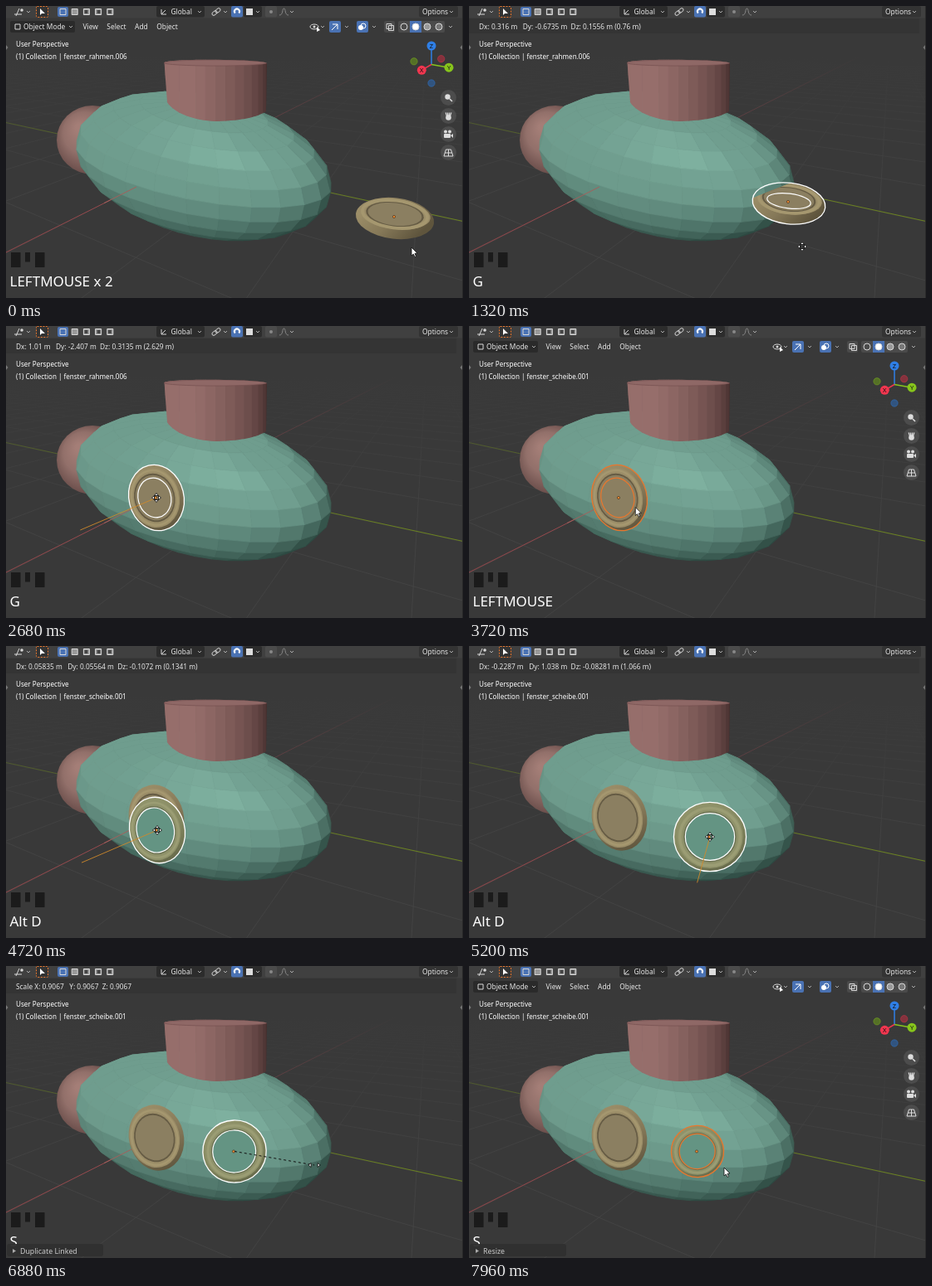
Write an HTML page with a canvas that moves like this. It is 550 px wide and 352 px high and loops after 8 s.

```html
<!DOCTYPE html>
<html lang="en">
<head>
<meta charset="utf-8">
<title>Placing portholes on a hull</title>
<style>
  html, body { margin: 0; width: 100%; height: 100%; overflow: hidden; background: #393939; }
  canvas { display: block; }
</style>
</head>
<body>
<canvas id="stage" width="550" height="352"></canvas>
<script>
const ctx = document.getElementById('stage').getContext('2d');
const LOOP = 8000, STEP = 40, TAU = Math.PI * 2;
const ORANGE = '#e9772d', BLUE = '#4a72b3', LIGHT = '#d8d8d8', DARK = '#2c2c2c';

// When each tool is active, and when the dragged frame snaps onto the hull
const GRAB = [940, 2900], COPY = [4300, 5500], RESIZE = [6600, 7350];
const SNAP = 1740, RESELECT = 3700;

const framePath = [
  { at: GRAB[0], x: 468, y: 256, move: [0, 0, 0] },
  { at: 1320, x: 385, y: 238, move: [.316, -.6735, .1556] },
  { at: 2520, x: 181, y: 207, move: [1.01, -2.407, .3135] }];
const copyPath = [
  { at: COPY[0], x: 181, y: 207, move: [0, 0, 0] },
  { at: 4720, x: 182, y: 222, move: [.05835, .05564, -.1072] },
  { at: 5200, x: 290, y: 230, move: [-.2287, 1.038, -.08281] },
  { at: COPY[1], x: 275, y: 223.5, move: [-.185, .9012, -.0364] }];

const lerp = (a, b, p) => a + (b - a) * p;
const clamp = v => Math.min(1, Math.max(0, v));
const progress = (t, [start, end]) => clamp((t - start) / (end - start));
const during = (t, [start, end]) => t >= start && t < end;

function along(path, t) {
  const next = Math.max(1, path.findIndex((stop, i) => stop.at > t || i === path.length - 1));
  const a = path[next - 1], b = path[next], p = progress(t, [a.at, b.at]);
  return { x: lerp(a.x, b.x, p), y: lerp(a.y, b.y, p), move: a.move.map((v, i) => lerp(v, b.move[i], p)) };
}
const glide = (a, b, p) => ({ x: lerp(a.x, b.x, p), y: lerp(a.y, b.y, p) });

// A porthole on the hull turns towards the viewer as it nears the middle
function onHull({ x, y }) {
  const d = x - 181;
  return { x, y, rx: 33 + d * .097, ry: 40 + d * .015, tilt: Math.min(0, d * .0022 - .24), shift: Math.min(0, d * .02 - 2.2) };
}
const onFloor = ({ x, y }) => ({ x, y, rx: 44 + (x - 385) * .04, ry: 24.7, tilt: .12, shift: 0, flat: true });

const mix = (a, b, p) => `rgb(${a.map((v, i) => Math.round(lerp(v, b[i], p))).join()})`;
function paint(fill, stroke, width = 1) {
  if (fill) { ctx.fillStyle = fill; ctx.fill(); }
  if (stroke) { ctx.strokeStyle = stroke; ctx.lineWidth = width; ctx.stroke(); }
}
function shape(points, fill, stroke, width, closed = true) {
  ctx.beginPath();
  points.forEach(([x, y]) => ctx.lineTo(x, y));
  if (closed) ctx.closePath();
  paint(fill, stroke, width);
}
const line = (x1, y1, x2, y2, color, width) => shape([[x1, y1], [x2, y2]], null, color, width, false);
function oval(x, y, rx, ry, tilt, fill, stroke, width) {
  ctx.beginPath();
  ctx.ellipse(x, y, rx, ry, tilt, 0, TAU);
  paint(fill, stroke, width);
}
const dot = (x, y, r, fill, stroke, width) => oval(x, y, r, r, 0, fill, stroke, width);
function box(x, y, w, h, fill, stroke, r = 2) {
  ctx.beginPath();
  ctx.roundRect(x, y, w, h, r);
  paint(fill, stroke);
}
function text(str, x, y, size = 8.4, color = '#e6e6e6', align = 'left') {
  ctx.font = `${size}px "Noto Sans", "Open Sans", sans-serif`;
  ctx.textAlign = align;
  ctx.fillStyle = color;
  ctx.fillText(str, x, y);
  return ctx.measureText(str).width;
}
const chevron = (x, y) => shape([[x - 2, y - 1], [x, y + 1], [x + 2, y - 1]], null, '#aaa', 1, false);
function gradient(g, ...colors) {
  colors.forEach((c, i) => g.addColorStop(i / (colors.length - 1), c));
  return g;
}

function drawFloor() {
  const kx = .172, ky = .097;
  const project = (x, y) => {
    const a = x * kx, b = y * ky, w = 1 + a + b;
    return [(217 + a * 506 - b * 458) / w, (188 + (a + b) * 42) / w];
  };
  ctx.fillStyle = '#393939';
  ctx.fillRect(0, 0, 550, 352);
  for (let n = -5; n <= 24; n++) {
    line(...project(n, (-.8 - n * kx) / ky), ...project(n, 60), '#464646', .8);
    line(...project((-.8 - n * ky) / kx, n), ...project(60, n), '#464646', .8);
  }
  line(0, 297, 217, 188, '#93474b');
  line(217, 188, 470, 61, '#8b454b');
  line(0, 140.5, 550, 259.5, '#6b8220');
  ctx.fillStyle = gradient(ctx.createLinearGradient(0, 60, 0, 240), '#393939', '#39393900');
  ctx.fillRect(0, 0, 550, 240);
}

function drawHull() {
  const RINGS = 12, SEGMENTS = 24;
  const light = [.57, -.03, .8], glint = [.68, .22, .7], view = [.8, .337, .5];
  const dot3 = (a, b) => a.reduce((sum, v, i) => sum + v * b[i], 0);
  const point = (ring, seg) => {
    const lat = (ring / RINGS - .5) * Math.PI, lon = seg / SEGMENTS * TAU;
    return [Math.cos(lat) * Math.cos(lon), Math.cos(lat) * Math.sin(lon), Math.sin(lat)];
  };
  const project = ([x, y, z]) => [238 - 60 * x + 142 * y, 193 + 30 * x + 40 * y - 75 * z];
  for (let r = 0; r < RINGS; r++) for (let s = 0; s < SEGMENTS; s++) {
    const [x, y, z] = point(r + .5, s + .5);
    if (dot3([x, y, z], view) < -.06) continue;
    const size = Math.hypot(x, y / 2, z), normal = [x / size, y / 2 / size, z / size];
    const gloss = Math.max(0, dot3(normal, glint)) ** 24;
    const color = mix([46, 75, 67], [111, 157, 142], clamp((dot3(normal, light) + .5) / 1.2) + gloss * .24);
    shape([[r, s], [r, s + 1], [r + 1, s + 1], [r + 1, s]].map(p => project(point(...p))), color, color, .8);
  }
  line(118, 237.6, 157, 218, '#a3605c');
}

function drawTower() {
  const COUNT = 16;
  ctx.save();
  ctx.beginPath();
  ctx.moveTo(190.5, 68);
  ctx.lineTo(194, 116);
  ctx.bezierCurveTo(204, 132, 234, 139, 255, 139);
  ctx.bezierCurveTo(285, 138, 302, 134, 313, 127);
  ctx.lineTo(314, 69);
  ctx.bezierCurveTo(310, 64, 196, 63, 190.5, 68);
  ctx.clip();
  for (let i = 0; i < COUNT; i++) {
    const edge = n => 252 - 62 * Math.cos(n / COUNT * Math.PI);
    ctx.fillStyle = mix([150, 110, 107], [70, 47, 46], clamp((i - 5) / 10) ** 1.3);
    ctx.fillRect(edge(i), 60, edge(i + 1) - edge(i) + .6, 82);
  }
  oval(252, 68.5, 62, 3.6, 0, '#8f6866', '#74504f', .7);
  ctx.restore();
}

function drawTail() {
  oval(104, 161.5, 43, 41.5, 0,
    gradient(ctx.createRadialGradient(88, 146, 4, 100, 160, 46), '#a47e77', '#92706a', '#664a47'));
}

function drawPorthole({ x, y, rx, ry, tilt, shift, flat }, { glass, outline, sunken }) {
  const ring = (scale, ...style) => oval(x + shift, flat ? y - 5 : y, rx * scale, ry * scale * (flat ? .8 : 1), tilt, ...style);
  const hole = glass ? .68 : .6;
  ctx.save();
  if (sunken) {
    ctx.beginPath();
    [[-50, -4], [8, -27], [60, -27], [60, 40], [-50, 40]].forEach(([dx, dy]) => ctx.lineTo(x + dx, y + dy));
    ctx.clip();
  }
  const side = ctx.createLinearGradient(x - rx / 2, y - ry, x + rx / 2, y + ry);
  oval(x, y, rx, ry, tilt, gradient(side, ...(glass ? ['#92956c', '#84875f', '#66694a'] : ['#9c8e68', '#857858', '#5f553d'])));
  ring(.91, glass ? '#8f926a' : '#9b8d68');
  ring(.83, null, glass ? '#9b9d74' : '#a5976f', rx * .08);
  if (glass) {
    ring(.73, '#6c7253');
    ring(hole, '#649483');
  } else {
    ring(.74, '#655b44');
    ring(.69, '#8b7f61');
  }
  ctx.restore();
  if (!outline) return;
  oval(x, y, rx, ry, tilt, null, outline, 1.3);
  oval(x + shift, flat ? y - 3 : y, rx * hole, ry * (flat ? .36 : hole), tilt, null, outline, 1.2);
}

function drawToolbar() {
  ctx.fillStyle = '#404040';
  ctx.fillRect(0, 0, 550, 14.5);
  line(10, 10, 19, 10, LIGHT);
  line(12, 12, 16, 3, LIGHT);
  dot(19, 5, 1.8, LIGHT);
  ctx.setLineDash([2, 1.5]);
  box(36.5, .5, 14, 13, '#333', ORANGE, 1);
  ctx.setLineDash([]);
  shape([[41, 3], [41, 11], [43, 9], [47, 9]], '#fff');
  for (let i = 0; i < 5; i++) {
    const x = 62 + i * 14.2;
    if (!i) box(x, 1, 13, 12, BLUE);
    box(x + 3, 3.5, 7, 7, i ? '#999' : null, LIGHT, 0);
    if (i > 1) box(x + 4 + i % 2, 5, 4, 4, '#444', null, 0);
  }
  box(181, 0, 58, 13.5, DARK);
  shape([[187, 4], [187, 10], [193, 10]], null, LIGHT, 1, false);
  line(187, 10, 192, 5, LIGHT);
  text('Global', 198.5, 10);
  oval(251, 8.5, 3.5, 2.2, -.7, null, LIGHT);
  oval(255, 5.5, 3.5, 2.2, -.7, null, LIGHT);
  box(271, 0, 14, 13.5, BLUE);
  ctx.beginPath();
  ctx.arc(278, 6.5, 3, 2.4, 7);
  paint(null, '#fff', 2);
  box(286, 0, 22, 13.5, DARK);
  box(289, 3, 8, 8, '#ddd', null, 0);
  box(312, 0, 14, 13.5, '#4b4b4b');
  dot(319, 7, 2, '#888');
  ctx.beginPath();
  ctx.moveTo(329, 11);
  ctx.bezierCurveTo(334, 11, 332, 3, 334.5, 3);
  ctx.bezierCurveTo(337, 3, 335, 11, 340, 11);
  paint(null, '#888');
  box(497, 0, 47, 13.5, '#333');
  text('Options', 501, 10);
  [27, 233, 264, 303, 344, 536].forEach(x => chevron(x, 7));
}

function drawHeader() {
  box(5, 18, 78, 14, '#2a2a2a');
  box(11, 22, 6, 6, null, LIGHT, 0);
  text('Object Mode', 21, 28);
  let x = 92.5;
  for (const label of ['View', 'Select', 'Add', 'Object']) x += text(label, x, 28) + 10.5;
  oval(371, 25, 5, 3, 0, null, LIGHT);
  dot(371, 25, 1.5, LIGHT);
  shape([[374, 25], [374, 31], [378, 29]], '#fff');
  [389, 422].forEach(left => box(left, 18, 14, 14, BLUE));
  shape([[393, 22], [399, 22], [399, 28]], null, '#fff', 1, false);
  line(392, 29, 399, 22, '#fff');
  dot(427, 26, 3, '#fff');
  dot(430, 24, 3, null, '#fff');
  box(455, 18, 13, 14, '#4a4a4a');
  [458, 460.5].forEach((left, i) => box(left, 21.5 + i * 2, 6, 6, null, LIGHT, 0));
  box(472, 18, 56, 14, '#4b4b4b');
  box(486, 18, 14, 14, BLUE, null, 0);
  [null, '#fff', '#999', '#777'].forEach((fill, i) => dot(479 + i * 14, 25, 4, fill, LIGHT));
  [78, 381, 410, 443, 535].forEach(left => chevron(left, 25));
}

function drawGizmo() {
  const axes = [
    { label: 'Z', dx: 0, dy: -22.5, color: '#2f7fe6', back: '#31547f' },
    { label: 'Y', dx: 21, dy: 3.7, color: '#87c51c', back: '#557026' },
    { label: 'X', dx: -11.7, dy: 6.8, color: '#f1364f', back: '#85323d' }];
  axes.forEach(({ dx, dy, back, color }) => dot(512 - dx, 70.5 - dy, 4.2, back, color + '66'));
  for (const { label, dx, dy, color } of axes) {
    line(512, 70.5, 512 + dx, 70.5 + dy, color, 1.5);
    dot(512 + dx, 70.5 + dy, 5.5, color);
    text(label, 512 + dx, 73.2 + dy, 7.5, '#111', 'center');
  }
  for (let i = 0; i < 4; i++) dot(532.5, 110.5 + i * 22, 9.5, '#4c4c4c');
  dot(531.5, 109.5, 3.2, '#ddd');
  line(534, 112, 537, 115, '#ddd', 1.6);
  dot(532.5, 134.5, 3.3, '#ddd');
  for (let i = -1.5; i < 2; i++) line(532.5 + i, 134, 532.5 + i * 2.2, 128.5, '#ddd', 1.3);
  box(527, 154, 8, 5, '#ddd', null, 1);
  [529, 534].forEach(left => dot(left, 151.5, 2, '#ddd'));
  shape([[535, 156], [538, 154], [538, 159]], '#ddd');
  shape([[529.5, 173], [535.5, 173], [538, 181], [527, 181]], null, '#ddd');
  line(532.5, 173, 532.5, 181, '#ddd');
  line(528, 177, 537, 177, '#ddd');
}

function drawArrow({ x, y }) {
  shape([[0, 0], [0, 10], [2.3, 8], [4, 11.5], [5.5, 10.8], [4, 7.3], [7, 7]]
    .map(p => [x + p[0], y + p[1]]), '#fff', '#111', .8);
}
function drawArrowheads({ x, y }, count, distance) {
  for (let i = 0; i < count; i++) {
    ctx.save();
    ctx.translate(x, y);
    ctx.rotate(i / count * TAU);
    shape([[distance, 0], [distance - 3, 2.5], [distance - 3, -2.5]], '#fff', '#111', .9);
    ctx.restore();
  }
}

const metres = v => parseFloat(v.toPrecision(4)) + ' m';
const moveText = ([dx, dy, dz]) =>
  `Dx: ${metres(dx)}   Dy: ${metres(dy)}  Dz: ${metres(dz)} (${metres(Math.hypot(dx, dy, dz))})`;
const scaleText = s => ['Scale X', '  Y', ' Z'].map(axis => `${axis}: ${s.toFixed(4)}`).join(' ');

function pointerAt(t, frame, copy, scale) {
  const aside = { x: 381, y: 238 }, edge = { x: copy.x + 106 * scale, y: 240 };
  if (t < GRAB[0]) return glide({ x: 488, y: 291 }, { x: 484, y: 308 }, progress(t, [0, GRAB[0]]));
  if (t < GRAB[1]) {
    const hold = 1 - progress(t, [1320, SNAP]);
    return { x: frame.x + 16 * hold, y: frame.y + 52 * hold };
  }
  if (t < COPY[0]) {
    const wander = Math.sin(progress(t, [GRAB[1], COPY[0]]) * Math.PI);
    return { x: frame.x + 20 * wander, y: frame.y + 12 * wander };
  }
  if (t < COPY[1]) return copy;
  if (t < RESIZE[0]) return glide(copy, aside, progress(t, [COPY[1], 6150]));
  return t < RESIZE[1] ? edge : glide(edge, { x: 307, y: 243 }, progress(t, [RESIZE[1], 7800]));
}

function drawPanel(label) {
  box(1, 335, 116, 15, 'rgba(48,48,48,.95)', null, 3);
  shape([[8, 341], [8, 346], [12, 343.5]], '#aaa');
  text(label, 17, 346.5, 8.8, '#ccc');
}

function drawOverlay(t) {
  text('User Perspective', 12, 48.8, 8.1, '#fff');
  text(`(1) Collection | fenster_${t < RESELECT ? 'rahmen.006' : 'scheibe.001'}`, 12, 63.5, 8.05, '#fff');
  ctx.fillStyle = '#2b2b2b';
  ctx.fillRect(549, 0, 1, 352);
  [[0, 2.5], [549, 546.5]].forEach(([base, tip]) => shape([[base, 47], [base, 53], [tip, 50]], '#777'));
  [6, 35].forEach(x => box(x, 297, 11.5, 18, '#1b1b1b', null, 0));
  box(23, 297, 6, 11.5, '#1b1b1b', null, 0);
  const keys = t < GRAB[0] ? 'LEFTMOUSE x 2' : t < RESELECT ? 'G' : t < COPY[0] ? 'LEFTMOUSE' : t < RESIZE[0] ? 'Alt D' : 'S';
  text(keys, 4.5, 338.3, 17, '#fff');
  if (during(t, [GRAB[1], RESELECT])) drawPanel('Move');
  if (t >= COPY[1]) drawPanel(t < RESIZE[1] ? 'Duplicate Linked' : 'Resize');
}

function render(t) {
  const moving = during(t, GRAB), copying = during(t, COPY), scaling = during(t, RESIZE);
  const modal = moving || copying || scaling, copied = t >= COPY[0];
  const scale = lerp(1, .75, progress(t, RESIZE));
  const framePos = along(framePath, t), copyPos = along(copyPath, t);
  const frame = (t < SNAP ? onFloor : onHull)(framePos), copy = onHull(copyPos);
  const outline = modal ? '#fff' : ORANGE, active = copied ? copyPos : framePos;
  copy.rx *= scale;
  copy.ry *= scale;

  drawFloor();
  drawTail();
  drawHull();
  drawTower();
  drawPorthole(frame, { outline: during(t, [400, COPY[0]]) && outline, sunken: during(t, [1180, SNAP]) });
  if (copied) drawPorthole(copy, { glass: true, outline });
  if (copying || during(t, [SNAP, GRAB[1]])) {
    const { x, y } = active;
    line(x, y, x + .7 * (x - 312), y + 39 + .15 * (x - 181), '#d08a2b', .9);
  }
  dot(active.x - 1, active.y - (t < SNAP ? 2 : 0), 1.6, '#ee8b32', '#4c3520', .7);

  drawToolbar();
  if (modal) {
    ctx.fillStyle = 'rgba(51,51,51,.75)';
    ctx.fillRect(0, 15, 542, 18);
    text(scaling ? scaleText(scale) : moveText(active.move), 12, 28, 8.35);
  } else {
    drawHeader();
    drawGizmo();
  }
  drawOverlay(t);

  const pointer = pointerAt(t, framePos, copyPos, scale);
  if (scaling) {
    ctx.setLineDash([3, 3]);
    line(copy.x, copy.y, pointer.x, pointer.y, '#111');
    ctx.setLineDash([]);
  }
  if (modal) drawArrowheads(pointer, scaling ? 2 : 4, scaling ? 7 : 5.5);
  else drawArrow(pointer);
}

function tick(now) {
  render(Math.floor(now % LOOP / STEP) * STEP);
  requestAnimationFrame(tick);
}
requestAnimationFrame(tick);
</script>
</body>
</html>
```
